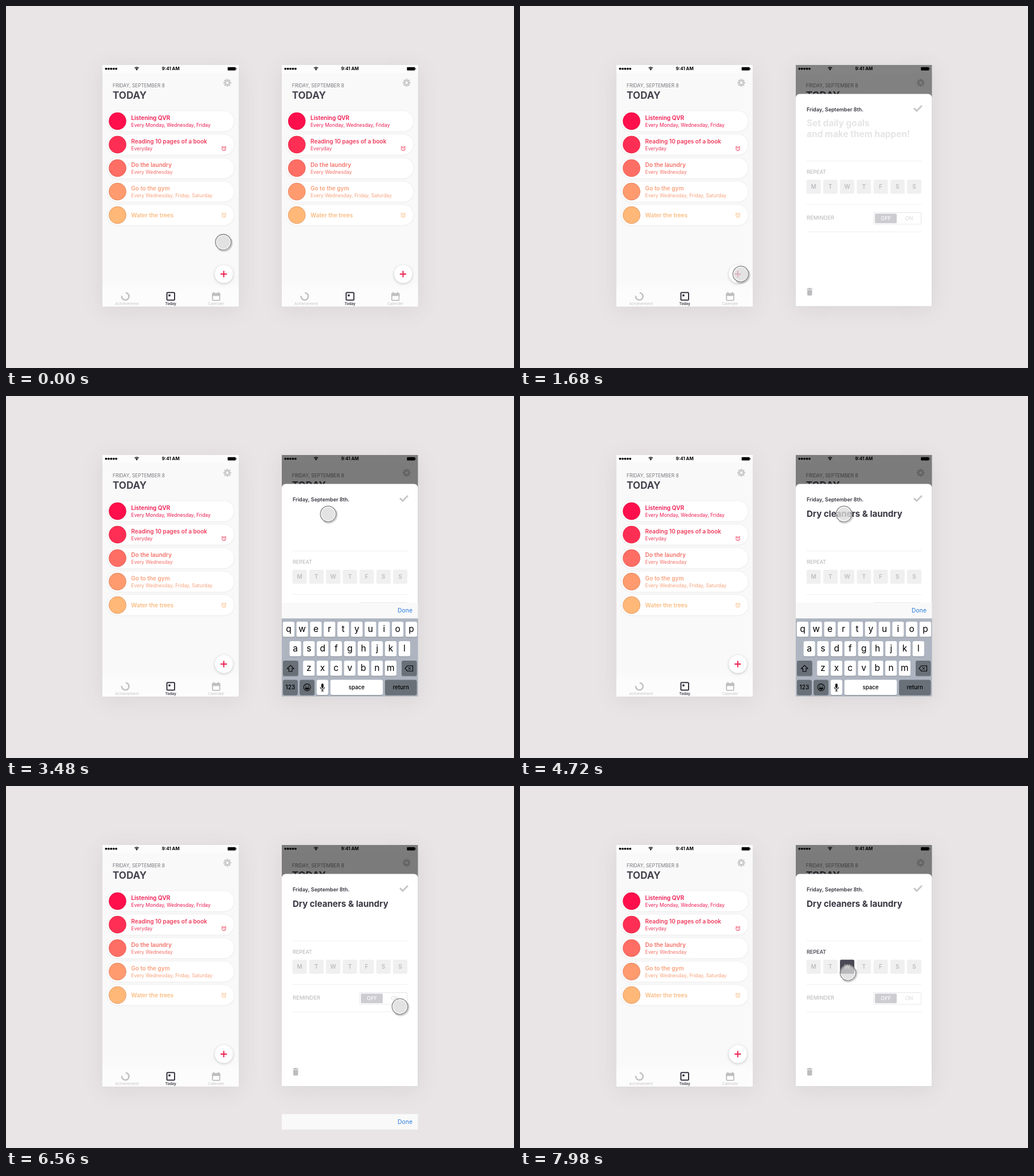
Write an HTML page with a canvas that moves like this. It is 886x632 px and loops after 8000 ms.

```html
<!DOCTYPE html>
<html lang="en">
<head>
<meta charset="utf-8">
<title>Daily goals</title>
<style>
html, body { margin: 0; width: 100%; height: 100%; overflow: hidden; background: #e9e5e6; }
canvas { display: block; width: 886px; height: 632px; }
</style>
</head>
<body>
<canvas id="stage"></canvas>
<script>
const W = 886, H = 632, LOOP = 8000;
const canvas = document.getElementById('stage');
const dpr = window.devicePixelRatio || 1;
canvas.width = W * dpr;
canvas.height = H * dpr;
const c = canvas.getContext('2d');
const TAU = Math.PI * 2;
const RIGHT = 312.7;
const DARK = '#373541', PALE = '#c4c4c6';

const tasks = [
  ['Listening QVR', 'Every Monday, Wednesday, Friday', '#ff0f4c', '#ee1950', 0],
  ['Reading 10 pages of a book', 'Everyday', '#ff2e54', '#ef3a5b', 1],
  ['Do the laundry', 'Every Wednesday', '#ff6e64', '#f47168', 0],
  ['Go to the gym', 'Every Wednesday, Friday, Saturday', '#ff9b6f', '#f8a27c', 0],
  ['Water the trees', '', '#ffb877', '#fbbb80', 1]
];

// Pointer path: time, x, y
const path = [
  [0, 379, 412], [120, 377, 455], [210, 376.5, 479], [330, 380, 477], [520, 385, 468],
  [1680, 385, 468], [1840, 397, 454], [1980, 445, 392], [2100, 530, 268], [2200, 580, 207],
  [2300, 585, 196], [2420, 571, 200], [2560, 562, 206],
  [4700, 562, 206], [4720, 565, 206], [5100, 568.5, 212.5], [5320, 587, 246], [5520, 635, 334],
  [5620, 681, 410], [5700, 705, 408], [5800, 703, 396], [5980, 687, 385],
  [6760, 687, 385], [7000, 676, 376], [7200, 620, 345], [7320, 586, 327], [7420, 573, 323],
  [7620, 572, 326], [8000, 572, 326]
];

const clamp = v => Math.max(0, Math.min(1, v));
const span = (t, a, b) => clamp((t - a) / (b - a));
const inOut = u => u < .5 ? 2 * u * u : 1 - 2 * (1 - u) * (1 - u);

function slope(i, k) {
  const a = path[i - 1], p = path[i], b = path[i + 1];
  if (!a) return (b[k] - p[k]) / (b[0] - p[0]);
  if (!b) return 0;
  const still = (m, n) => m[1] === n[1] && m[2] === n[2];
  if (still(a, p) || still(p, b)) return 0;
  return (b[k] - a[k]) / (b[0] - a[0]);
}

function pointer(t) {
  let i = 0;
  while (i < path.length - 2 && path[i + 1][0] <= t) i++;
  const a = path[i], b = path[i + 1], d = b[0] - a[0], u = (t - a[0]) / d;
  const u2 = u * u, u3 = u2 * u;
  return [1, 2].map(k =>
    (2 * u3 - 3 * u2 + 1) * a[k] + (u3 - 2 * u2 + u) * d * slope(i, k) +
    (3 * u2 - 2 * u3) * b[k] + (u3 - u2) * d * slope(i + 1, k));
}

function text(s, x, y, size, color, weight = 400, align = 'left') {
  c.font = `${weight} ${size}px Inter, "Open Sans", sans-serif`;
  c.textAlign = align;
  c.fillStyle = color;
  c.fillText(s, x, y);
}

function box(x, y, w, h, color, r = 0) {
  c.beginPath();
  c.roundRect(x, y, w, h, r);
  c.fillStyle = color;
  c.fill();
}

function frame(x, y, w, h, color, lw, r = 0) {
  c.beginPath();
  c.roundRect(x, y, w, h, r);
  c.strokeStyle = color;
  c.lineWidth = lw;
  c.stroke();
}

function disc(x, y, r, color) {
  c.beginPath();
  c.arc(x, y, r, 0, TAU);
  c.fillStyle = color;
  c.fill();
}

function arc(x, y, r, a, b, color, lw) {
  c.beginPath();
  c.arc(x, y, r, a, b);
  c.strokeStyle = color;
  c.lineWidth = lw;
  c.stroke();
}

function line(points, color, lw, close) {
  c.beginPath();
  for (let i = 0; i < points.length; i += 2) c.lineTo(points[i], points[i + 1]);
  if (close) c.closePath();
  c.strokeStyle = color;
  c.lineWidth = lw;
  c.stroke();
}

function shadow(color, blur, y) {
  c.shadowColor = color;
  c.shadowBlur = blur * dpr;
  c.shadowOffsetY = y * dpr;
}
const noShadow = () => shadow('transparent', 0, 0);

function statusBar() {
  for (let i = 0; i < 5; i++) disc(174.6 + i * 4.4, 109.6, 1.9, '#000');
  for (let i = 0; i < 2; i++) arc(228, 112, 5.2 - i * 2.3, -2.35, -.79, '#000', 1.3);
  disc(228, 111.2, 1.1, '#000');
  text('9:41 AM', 287.2, 112.4, 7.8, '#000', 700, 'center');
  box(386.6, 106.8, 14, 5.6, '#000', 1);
  box(401.2, 108.4, 1, 2.4, '#000');
}

function gear(x, y) {
  for (let i = 0; i < 8; i++) {
    const a = i * TAU / 8, p = Math.cos(a), q = Math.sin(a);
    line([x + p * 3, y + q * 3, x + p * 7, y + q * 7], '#cbcbcb', 2.7);
  }
  arc(x, y, 3.7, 0, TAU, '#cbcbcb', 2.9);
}

function alarm(x, y, color) {
  arc(x, y + .3, 3.3, 0, TAU, color, 1);
  line([x, y - 1.6, x, y + .6, x + 1.4, y + 1.5], color, .8);
  line([x - 4.2, y - 2.6, x - 2, y - 4.3], color, 1);
  line([x + 4.2, y - 2.6, x + 2, y - 4.3], color, 1);
}

function taskRow([title, note, fill, ink, bell], y) {
  shadow('rgba(0,0,0,.07)', 3, .5);
  box(177, y - 18, 221, 36, '#fff', 18);
  noShadow();
  frame(177, y - 18, 221, 36, '#f0eff0', .7, 18);
  disc(194.5, y, 15.2, fill);
  arc(194.5, y, 15, 0, TAU, 'rgba(120,40,40,.3)', .7);
  text(title, 218.3, y + (note ? -1.7 : 4.2), 10, ink, 600);
  text(note, 218.3, y + 9.6, 8.5, ink);
  if (bell) alarm(380, y + (note ? 7 : .5), ink);
}

function tabs() {
  const g = c.createLinearGradient(0, 480, 0, 498);
  g.addColorStop(0, 'rgba(252,252,252,0)');
  g.addColorStop(1, '#fcfcfc');
  c.fillStyle = g;
  c.fillRect(168.3, 480, 237.5, 44.5);
  arc(208.2, 507, 6.3, -1.5, 3.3, '#c2c2c4', 2.6);
  text('Achievement', 211, 521.6, 6.7, PALE, 400, 'center');
  frame(280.6, 500.2, 13.4, 13.4, DARK, 2, 1.5);
  box(283.3, 503.4, 3.6, 3.6, DARK, 1);
  text('Today', 287.2, 521.6, 6.4, DARK, 600, 'center');
  frame(360.2, 502.2, 12.6, 11.6, '#bfbfc1', 1.8, 1);
  box(359.3, 501.3, 14.4, 5, '#bfbfc1', 1);
  box(361.5, 499.3, 2, 3, '#bfbfc1');
  box(369.5, 499.3, 2, 3, '#bfbfc1');
  text('Calender', 366.5, 521.9, 6.5, PALE, 400, 'center');
}

function phone(dx) {
  c.save();
  c.translate(dx, 0);
  shadow('rgba(90,70,80,.1)', 36, 6);
  box(168.3, 103, 237.5, 421.5, '#f9f9f9');
  noShadow();
  box(168.3, 103, 237.5, 14, '#fcfcfc');
  statusBar();
  gear(386, 134);
  text('FRIDAY, SEPTEMBER 8', 186, 142.4, 8.4, '#77757c');
  text('TODAY', 186, 161.8, 17, '#45434f', 700);
  tasks.forEach((task, i) => taskRow(task, 201 + i * 41));
  tabs();
  shadow('rgba(0,0,0,.22)', 4, 1.2);
  disc(380, 468, 15.8, '#fff');
  noShadow();
  line([374.2, 468, 385.4, 468], '#ea2350', 2);
  line([379.8, 462.4, 379.8, 473.6], '#ea2350', 2);
  c.restore();
}

function sheet(t) {
  const y = 480 * (1 - inOut(span(t, 1180, 1660)));
  const pick = span(t, 7850, 7960);
  c.save();
  c.translate(0, y);
  box(481, 153.4, 237.5, 371.1, '#fff', [7, 7, 0, 0]);
  line([481, 524.3, 718.5, 524.3], '#dcdadb', .6);
  text('Friday, September 8th.', 500, 183.6, 9, DARK, 600);
  line([687, 178.3, 691.8, 183.2, 701, 174], '#c6c6c8', 2.8);

  c.globalAlpha = 1 - span(t, 3320, 3440);
  text('Set daily goals', 500, 210.4, 15.4, '#e5e5e7', 700);
  text('and make them happen!', 500, 229, 15.4, '#e5e5e7', 700);
  c.globalAlpha = span(t, 4240, 4400);
  text('Dry cleaners & laundry', 500, 210.6, 15, DARK, 700);
  c.globalAlpha = 1;

  for (const d of [270.5, 346.5, 394.3]) line([500, d, 700, d], '#efeff0', 1);
  text('REPEAT', 500, 293.4, 9, '#bcbcbf', 500);
  c.globalAlpha = pick;
  text('REPEAT', 500, 293.4, 9, '#4a4854', 500);
  c.globalAlpha = 1;
  [...'MTWTFSS'].forEach((d, i) => {
    const x = 499.6 + i * 29.25;
    box(x, 303.2, 25, 24.6, '#f0f0f1', 2.5);
    if (i === 2 && pick) {
      c.globalAlpha = pick;
      box(x, 303.2, 25, 24.6, '#4a4854', 2.5);
      c.globalAlpha = 1;
    }
    text(d, x + 12.4, 319.4, 10, '#bebec2', 600, 'center');
  });
  text('REMINDER', 500, 373.3, 9.3, '#bfbfc2', 500);
  frame(617, 360.6, 82.6, 20.4, '#e9e9ea', 1.2, 2);
  box(619, 362.4, 38, 16.8, '#cdcdd1', 1.5);
  text('OFF', 638.3, 374, 9.2, '#fff', 500, 'center');
  text('ON', 678.5, 374, 9.2, '#d7d7da', 400, 'center');

  box(500.2, 493.4, 9.8, 1.6, '#bcbcbe');
  box(503, 492.2, 4.2, 2, '#bcbcbe');
  box(501, 495.8, 8.4, 9.8, '#bcbcbe', [0, 0, 1.5, 1.5]);
  c.restore();
}

function key(x, y, w, label, dark, size = 15.5, weight = 400) {
  box(x, y + 1, w, 26.6, '#858a92', 3.2);
  box(x, y, w, 26.6, dark ? '#697078' : '#fff', 3.2);
  text(label, x + w / 2, y + (size > 12 ? 18.3 : 16.6), size, '#000', weight, 'center');
}

function keyRow(letters, x, y) {
  [...letters].forEach((l, i) => key(x + i * 23.78, y, 20.2, l));
}

function keyboard(dy) {
  c.save();
  c.translate(0, dy);
  box(481, 388, 237.5, 136.5, '#aeb5c1');
  keyRow('qwertyuiop', 482.8, 394);
  keyRow('asdfghjkl', 494.5, 428);
  keyRow('zxcvbnm', 518.1, 462);
  key(483, 462, 26.6, '', 1);
  key(690, 462, 26.4, '', 1);
  line([496.2, 470.2, 502, 476, 499, 476, 499, 481, 493.4, 481, 493.4, 476, 490.4, 476], '#000', 1.1, true);
  line([696, 475.6, 700, 471, 709.5, 471, 709.5, 480.2, 700, 480.2], '#000', 1.1, true);
  line([701.6, 473.4, 706, 477.8], '#000', 1);
  line([706, 473.4, 701.6, 477.8], '#000', 1);

  key(483, 495.4, 25.8, '123', 1, 10, 500);
  key(512.2, 495.4, 25.8, '', 1);
  key(541.8, 495.4, 20.2, '');
  key(565.8, 495.4, 91.4, 'space', 0, 9.7, 500);
  key(661, 495.4, 55.4, 'return', 1, 9.7, 500);
  arc(525.1, 508.6, 6, 0, TAU, '#000', 1.1);
  disc(522.9, 506.6, .9, '#000');
  disc(527.3, 506.6, .9, '#000');
  c.beginPath();
  c.arc(525.1, 509, 3.7, 0, Math.PI);
  c.fill();
  box(550, 502, 3.8, 8, '#000', 1.9);
  arc(551.9, 508.2, 3.8, 0, Math.PI, '#000', 1);
  line([551.9, 512, 551.9, 515], '#000', 1);
  line([549.6, 515, 554.2, 515], '#000', 1);
  c.restore();
}

function doneBar(dy) {
  box(481, 361 + dy, 237.5, 27.2, '#f9f9f9');
  text('Done', 709, 378.4 + dy, 10.4, '#2a7ce0', 400, 'right');
}

function cursor(t) {
  const [x, y] = pointer(t);
  const press = Math.sin(Math.PI * span(t, 780, 1060));
  const s = 1 - .13 * press;
  c.save();
  c.translate(x, y);
  c.scale(s, s);
  arc(.9, 1.3, 14.4, -.5, 2.3, 'rgba(0,0,0,.16)', 2.6);
  disc(0, 0, 13.4, 'rgba(240,240,240,.55)');
  disc(0, 0, 11.3, 'rgba(208,208,208,.5)');
  arc(0, 0, 13.7, 0, TAU, 'rgba(128,128,128,.85)', 1.6);
  c.restore();
}

function draw(t) {
  c.setTransform(dpr, 0, 0, dpr, 0, 0);
  c.fillStyle = '#e9e5e6';
  c.fillRect(0, 0, W, H);
  phone(0);
  phone(RIGHT);
  if (t >= 1180) {
    const dim = .505 * (1 - Math.pow(1 - span(t, 1180, 1960), 3));
    box(481, 103, 237.5, 421.5, `rgba(0,0,0,${dim})`);
    sheet(t);
  }
  if (t >= 3340 && t < 6900) {
    const rise = 90 * Math.pow(1 - span(t, 3340, 3480), 2);
    const drop = delay => 398 * inOut(span(t, 6180 + delay, 6860 + delay));
    keyboard(rise + drop(0));
    doneBar(rise + drop(30));
  }
  cursor(t);
}

const start = performance.now();
function tick() {
  draw((performance.now() - start) % LOOP);
  requestAnimationFrame(tick);
}
tick();
</script>
</body>
</html>
```
